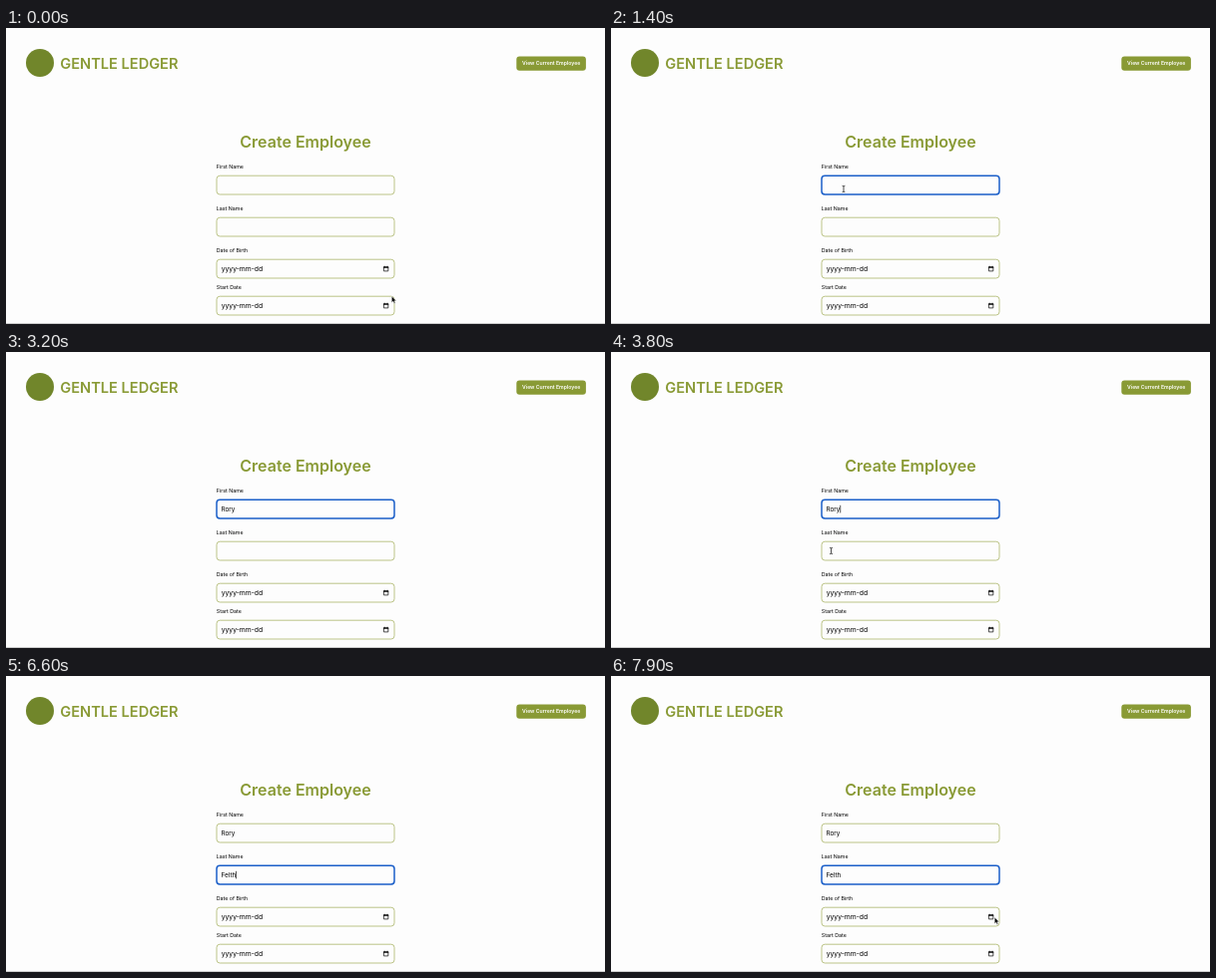
Write an HTML page that moves like this. It is 600 by 297 pixels and loops after 8000 ms.

```html
<!DOCTYPE html>
<html lang="en">
<head>
<meta charset="utf-8">
<title>Create Employee</title>
<style>
  html, body { margin: 0; width: 100%; height: 100%; overflow: hidden; background: #fdfdfd; }
  svg { display: block; width: 600px; height: 297px; font-family: Inter, "Open Sans", sans-serif; }
  .brand { fill: #899a35; font-weight: 600; }
  .label { font-size: 5.3px; }
  .value { font-size: 6.4px; }
  .date { font-size: 6.8px; }
  .button { font-size: 5.15px; font-weight: 600; fill: #fff; text-anchor: middle; }
  .field { fill: #fdfdfd; stroke: #bcc487; stroke-width: 1; }
  .field.focus { stroke: #1b5fc9; stroke-width: 1.5; }
</style>
</head>
<body>
<svg viewBox="0 0 600 297">
  <defs>
    <g id="calendar">
      <path d="M.4 1.2h4.4v4H.4z" fill="none" stroke="#111" stroke-width=".75"/>
      <path d="M0 .7h5.2v1.4H0zM.8 0h.8v1H.8zM3.6 0h.8v1h-.8z" fill="#111"/>
    </g>
  </defs>
  <rect width="600" height="297" fill="#fdfdfd"/>
  <circle cx="34" cy="35" r="14" fill="#71862b"/>
  <text class="brand" x="54.3" y="41.4" font-size="14.6">GENTLE LEDGER</text>
  <rect x="511.3" y="28.5" width="69.6" height="14.2" rx="3" fill="#899a35"/>
  <text class="button" x="546.2" y="37.4">View Current Employee</text>
  <text class="brand" x="300" y="119.6" font-size="16" text-anchor="middle">Create Employee</text>
  <g id="form"></g>
  <rect id="caret" width=".7" height="7.6" fill="#111"/>
  <path id="arrow" d="M0 0V6.6L1.5 5.2L2.6 7.6L3.7 7.1L2.6 4.8H4.7Z" fill="#000" stroke="#fff" stroke-width=".5"/>
  <path id="beam" d="M-1.4-3.2Q0-3.2 0-2.3Q0-3.2 1.4-3.2M0-2.4V2.4M-1.4 3.2Q0 3.2 0 2.3Q0 3.2 1.4 3.2" fill="none" stroke="#222" stroke-width=".8"/>
  <path d="M0 296.5H600" stroke="#cfcfcf"/>
</svg>
<script>
  const LOOP = 8000, STEP = 100, BLINK = 500;
  const byId = id => document.getElementById(id);
  const form = byId('form'), caret = byId('caret'), arrow = byId('arrow'), beam = byId('beam');

  function add(tag, attrs, text = '') {
    const node = document.createElementNS('http://www.w3.org/2000/svg', tag);
    for (const key in attrs) node.setAttribute(key, attrs[key]);
    node.textContent = text;
    return form.appendChild(node);
  }

  function addField(label, top) {
    add('text', { class: 'label', x: 210.8, y: top - 7.3 }, label);
    const box = add('rect', { class: 'field', x: 211, y: top, width: 178, height: 18.8, rx: 3.2 });
    return { top, box };
  }

  function addTextField(label, top, value, focusAt, blurAt, keys) {
    const field = addField(label, top);
    field.text = add('text', { class: 'value', x: 215.5, y: top + 11.5 });
    return Object.assign(field, { value, focusAt, blurAt, keys });
  }

  function addDateField(label, top) {
    addField(label, top);
    add('text', { class: 'date', x: 215.7, y: top + 11.4 }, 'yyyy-mm-dd');
    add('use', { href: '#calendar', x: 378, y: top + 6.5 });
  }

  const fields = [
    addTextField('First Name', 148.2, 'Rory', 900, 3900, [1900, 2100, 2400, 2700]),
    addTextField('Last Name', 190.2, 'Felth', 3900, LOOP, [4800, 5000, 5100, 6100, 6400])
  ];
  addDateField('Date of Birth', 232.2);
  addDateField('Start Date', 269.2);

  // Pointer strokes: each is a list of [time, x, y]; hidden between strokes while typing.
  const strokes = [
    { until: 1900, points: [[0, 386.3, 269], [200, 380, 262], [900, 255.5, 159], [1200, 233, 161.5]] },
    { until: 4800, points: [[3300, 233, 161.5], [3700, 220.5, 199.5]] },
    { until: LOOP, points: [[6800, 220.5, 199.5], [7100, 250, 215], [7600, 380.5, 245], [7700, 386, 245], [7900, 384.2, 242]] }
  ];

  function pointAt(points, t) {
    const next = points.findIndex(p => p[0] > t);
    if (next < 0) return points[points.length - 1].slice(1);
    const [t0, x0, y0] = points[next - 1], [t1, x1, y1] = points[next];
    const u = (t - t0) / (t1 - t0), k = u * u * (3 - 2 * u);
    return [x0 + (x1 - x0) * k, y0 + (y1 - y0) * k];
  }

  function show(node, visible) {
    node.style.visibility = visible ? 'visible' : 'hidden';
  }

  function drawFields(t) {
    let caretOn = false;
    for (const f of fields) {
      const typed = f.keys.filter(k => k <= t);
      const focused = t >= f.focusAt && t < f.blurAt;
      f.text.textContent = f.value.slice(0, typed.length);
      f.box.classList.toggle('focus', focused);
      if (!focused) continue;
      const since = t - Math.max(f.focusAt, ...typed);
      caretOn = since % (2 * BLINK) < BLINK;
      const width = typed.length ? f.text.getComputedTextLength() : 0;
      caret.setAttribute('x', 215.5 + width);
      caret.setAttribute('y', f.top + 5.6);
    }
    show(caret, caretOn);
  }

  function drawPointer(t) {
    const stroke = strokes.find(s => t >= s.points[0][0] && t < s.until);
    const [x, y] = stroke ? pointAt(stroke.points, t) : [0, 0];
    const overText = fields.some(f => x > 211 && x < 389 && y > f.top && y < f.top + 19);
    show(arrow, stroke && !overText);
    show(beam, stroke && overText);
    (overText ? beam : arrow).setAttribute('transform', `translate(${x} ${y})`);
  }

  const start = performance.now();
  function frame() {
    const elapsed = (performance.now() - start) % LOOP;
    const t = Math.floor(elapsed / STEP) * STEP;
    drawFields(t);
    drawPointer(t);
    requestAnimationFrame(frame);
  }
  frame();
</script>
</body>
</html>
```
